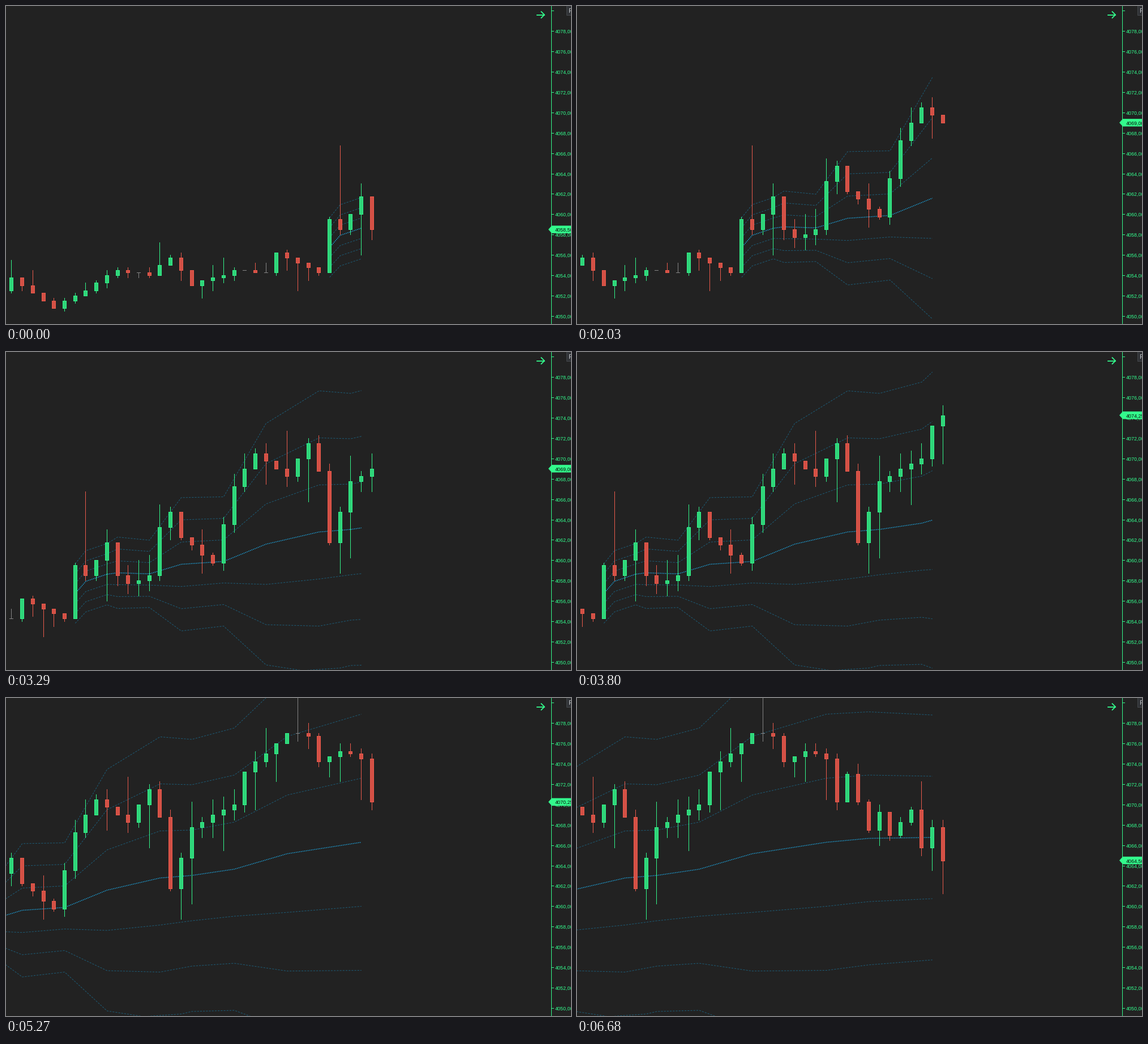
Write a matplotlib script that moves like this. It is 998 px wide and 561 px high and loops after 6700 ms.

```python
import numpy as np
import matplotlib.pyplot as plt
from matplotlib.animation import FuncAnimation
from matplotlib.collections import PolyCollection
from matplotlib.patches import Polygon, Rectangle

W, H, DPI = 998, 561, 100
LOOP, STEP = 6700, 20
BAR_MS = 136  # a new bar arrives at this pace
PITCH, SLOTS, BARS = 18.72, 35, 84
ANCHOR = 30  # bar where the bands begin

BACK, GREEN = "#222222", "#33fa8c"
UP, DOWN, FLAT = ("#2fd479", "#33f58a"), ("#d35045", "#ea5a4c"), ("#858585", "#858585")
BAND, MEAN = "#1d5a74", "#1ea6e0"

# Turning points of the closing price: bar -> quarter points above 4050
turns = {0: 15, 4: 3, 10: 18, 13: 16, 15: 23, 17: 12, 21: 18, 24: 17, 25: 25,
         29: 17, 30: 38, 31: 34, 33: 47, 34: 34, 35: 31, 37: 34, 38: 53,
         39: 59, 40: 49, 43: 39, 45: 69, 47: 82, 50: 73, 52: 86, 53: 75,
         54: 47, 56: 71, 60: 80, 61: 93, 65: 108, 67: 107, 68: 97, 70: 101,
         72: 98, 73: 81, 74: 92, 76: 70, 77: 77, 78: 68, 80: 78, 81: 63,
         82: 71, 83: 58}

# Bands: bars after the anchor -> height of the mean and one deviation, in pixels
bends = {0: (426, 17.5), 1: (404.5, 18), 3: (392, 18), 4: (389.5, 21),
         7: (391.4, 19.8), 10: (374.5, 39.2), 14: (369.5, 38), 18: (339, 71),
         23: (317.5, 83), 26: (313, 80), 30: (302, 83), 35: (274.7, 103.5),
         42: (254.5, 113), 46: (247.6, 111.6), 52: (246, 108)}

# Each bar opens at the previous close; wicks grow once the market wakes up
rng = np.random.default_rng(4)
bars = np.arange(BARS)
closes = np.round(np.interp(bars, list(turns), list(turns.values()))).astype(int)
opens = np.concatenate([[10], closes[:-1]])
spread = np.where(bars < ANCHOR, 2, 4.5)
highs = np.maximum(opens, closes) + rng.exponential(spread).astype(int)
lows = np.minimum(opens, closes) - rng.exponential(spread).astype(int)

steps = np.arange(BARS - ANCHOR)
mean, dev = (np.interp(steps, list(bends), col) for col in zip(*bends.values()))


def tick_y(ticks):
    return 44.3 + (112 - ticks) * 4.486


def price_text(ticks):
    return f"{4050 + ticks / 4:.2f}".replace(".", ",")


def px(size):
    return size * 72 / DPI


def box(x0, y0, x1, y1):
    return [(x0, y0), (x1, y0), (x1, y1), (x0, y1)]


def candle(i, x):
    """Rectangles and colours of one bar: wick, border, body."""
    high, top, bottom, low = (
        round(tick_y(v)) for v in (highs[i], max(opens[i], closes[i]),
                                   min(opens[i], closes[i]), lows[i]))
    change = closes[i] - opens[i]
    fill, edge = UP if change > 0 else DOWN if change < 0 else FLAT
    shapes = [box(x, high, x + 1, low + 1), box(x - 3, top, x + 4, bottom + 1)]
    colors = [edge, edge]
    if change:
        shapes.append(box(x - 2, top + 1, x + 3, bottom))
        colors.append(fill)
    return shapes, colors


fig = plt.figure(figsize=(W / 100, H / 100), dpi=DPI, facecolor=BACK)
ax = fig.add_axes([0, 0, 1, 1])
ax.set_xlim(0, W)
ax.set_ylim(H, 0)
ax.axis("off")


def label(x, y, text, color, size=8.9, z=4):
    return ax.text(x, y, text, color=color, fontsize=px(size), zorder=z,
                   family="Liberation Sans", va="center_baseline", ha="left")


# Price scale
scale = [box(963, 0, 964, H)]
for ticks in range(0, 121, 8):
    y = round(tick_y(ticks))
    scale.append(box(964, y, 968, y + 1))
    if ticks < 120:
        label(970, y + 0.5, price_text(ticks), GREEN)
ax.add_collection(PolyCollection(scale, facecolors=GREEN, linewidths=0,
                                 antialiaseds=False, zorder=4))

# Arrow and corner button
for xs, ys in (([938, 951], [15.5, 15.5]), ([945.5, 951, 945.5], [10, 15.5, 21])):
    ax.plot(xs, ys, color=GREEN, lw=px(1.8), zorder=4)
ax.add_patch(Rectangle((990.5, -1), 12, 16.5, fc="#303236", ec="#45484c",
                       lw=px(1), zorder=4))
label(993, 8, "F", "#c8ccd0", 11, 5)

# Moving parts
bands = {k: ax.plot([], [], color=BAND, lw=px(1), ls=(0, (3.2, 2)), zorder=2)[0]
         for k in (-3, -2, -1, 1, 2, 3)}
bands[0] = ax.plot([], [], color=MEAN, lw=px(1.5), ls=(0, (1, 1)), zorder=2.5)[0]
candles = PolyCollection([], linewidths=0, antialiaseds=False, zorder=3)
ax.add_collection(candles, autolim=False)
tag = ax.add_patch(Polygon([(0, 0)], closed=True, fc=GREEN, lw=0, zorder=6))
tag_text = label(970, 0, "", "#06120b", z=7)


def draw(frame):
    t = frame * STEP + STEP / 2
    first = int((t + 38) // BAR_MS)
    last = first + SLOTS - 1

    shapes, colors = [], []
    for slot in range(SLOTS):
        s, c = candle(first + slot, int(9.9 + PITCH * slot))
        shapes += s
        colors += c
    candles.set_verts(shapes)
    candles.set_facecolor(colors)

    n = last - ANCHOR
    xs = 10 + PITCH * (ANCHOR - first + steps[:n])
    for k, line in bands.items():
        line.set_data(xs, mean[:n] + k * dev[:n])

    y = tick_y(closes[last])
    tag.set_xy([(958, y), (964, y - 6.7), (W + 2, y - 6.7),
                (W + 2, y + 6.7), (964, y + 6.7)])
    tag_text.set_position((970, y + 0.3))
    tag_text.set_text(price_text(closes[last]))
    return [candles, tag, tag_text, *bands.values()]


anim = FuncAnimation(fig, draw, frames=LOOP // STEP, interval=STEP,
                     repeat=True, repeat_delay=0, blit=False)
plt.show()
```
